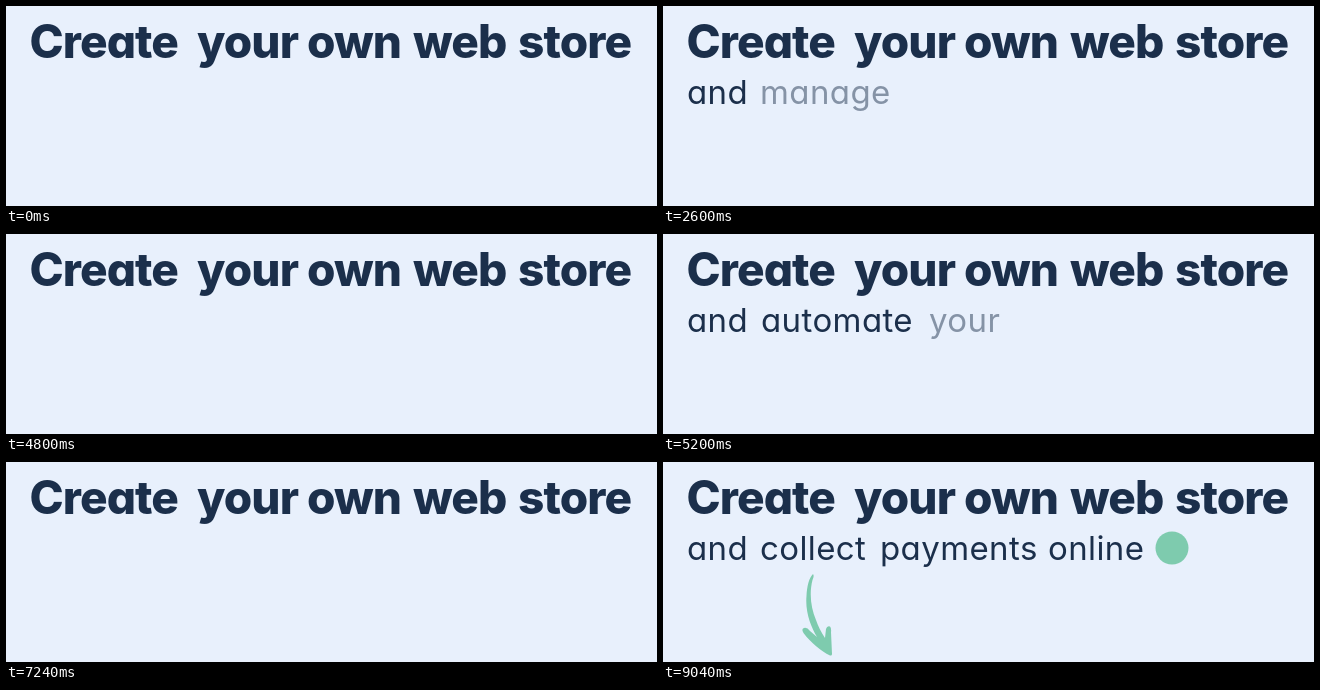
An HTML page for the animation above (9.72 s loop, 651x200 px).

```html
<!DOCTYPE html>
<html lang="en">
<head>
<meta charset="utf-8">
<title>Create your own web store</title>
<style>
  html, body { margin: 0; width: 100%; height: 100%; overflow: hidden; background: #e8f0fc; }
  svg { display: block; width: 651px; height: 200px; }
  text {
    font-family: Inter, Lato, sans-serif;
    font-feature-settings: "cv11";
    font-optical-sizing: none;
    fill: #1b2f4b;
  }
  .title { font-size: 46px; font-weight: 800; letter-spacing: -0.9px; }
  .line { font-size: 33px; letter-spacing: 0.4px; }
  .accent { fill: #7ecbae; }
</style>
</head>
<body>
<svg id="stage" viewBox="0 0 651 200"></svg>
<script>
const LOOP = 9720;
const FRAME = 40;
const ARROW = `M150 112 Q151.5 114 149.5 118 C146 132 148 146 153 158
  C155 164 158 170 162 176 L163 167 Q164 163.5 167 164.5 Q168.5 166 168 170
  L169 192 Q169 194 167 193.5 C158 189 148 181 140.5 171 Q138 167 141 166
  Q144 165 147 169 L154 175 C148 165 142 150 143.5 134 C144 124 146 116 150 112Z`;

const title = [["Create", 23.5], ["your", 191], ["own", 301], ["web", 407], ["store", 512]];

// first: first word appears; dot: [shown, hidden, shown again]; arrow: fade starts
const lines = [
  { words: [["in", 29], ["just", 66], ["29", 133], ["seconds", 177]],
    first: 40, dot: [440, 1000, 1360], arrow: 1480, end: 2280, cx: 339, cy: 86 },
  { words: [["and", 24], ["manage", 97], ["your", 242], ["inventory", 321]],
    first: 2440, dot: [2880, 3400, 3800], arrow: 3880, end: 4800, cx: 498, cy: 87 },
  { words: [["and", 24], ["automate", 98], ["your", 266], ["deliveries", 342]],
    first: 4880, dot: [5320, 5840, 6240], arrow: 6320, end: 7240, cx: 522, cy: 86 },
  { words: [["and", 24], ["collect", 97], ["payments", 217], ["online", 385]],
    first: 7320, dot: [7760, 8280, 8680], arrow: 8800, end: LOOP, cx: 509, cy: 86 },
];

const stage = document.getElementById("stage");

function add(tag, attributes, content = "") {
  const el = document.createElementNS("http://www.w3.org/2000/svg", tag);
  for (const name in attributes) el.setAttribute(name, attributes[name]);
  el.textContent = content;
  return stage.appendChild(el);
}

// steps: [time, opacity] pairs, each held until the next
function play(el, steps) {
  const frames = [[0, 0], ...steps, [LOOP, 0]].map(([time, opacity]) =>
    ({ offset: time / LOOP, opacity, easing: "step-end" }));
  el.animate(frames, { duration: LOOP, iterations: Infinity });
}

for (const [word, x] of title) add("text", { class: "title", x, y: 52.3 }, word);

for (const { words, first, dot, arrow, end, cx, cy } of lines) {
  words.forEach(([word, x], i) => {
    const start = first + i * 160;
    const full = start + (i === 3 ? FRAME : 2 * FRAME);
    play(add("text", { class: "line", x, y: 97.5 }, word),
      [[start, 0.48], [full, 1], [end, 0]]);
  });

  const [on, off, again] = dot;
  play(add("circle", { class: "accent", cx, cy, r: 16.5 }),
    [[on, 1], [off, 0], [again, 1], [end, 0]]);

  const fade = Array.from({ length: 7 }, (_, i) => [arrow + i * FRAME, (i + 1) / 7]);
  play(add("path", { class: "accent", d: ARROW }), [...fade, [end, 0]]);
}
</script>
</body>
</html>
```
